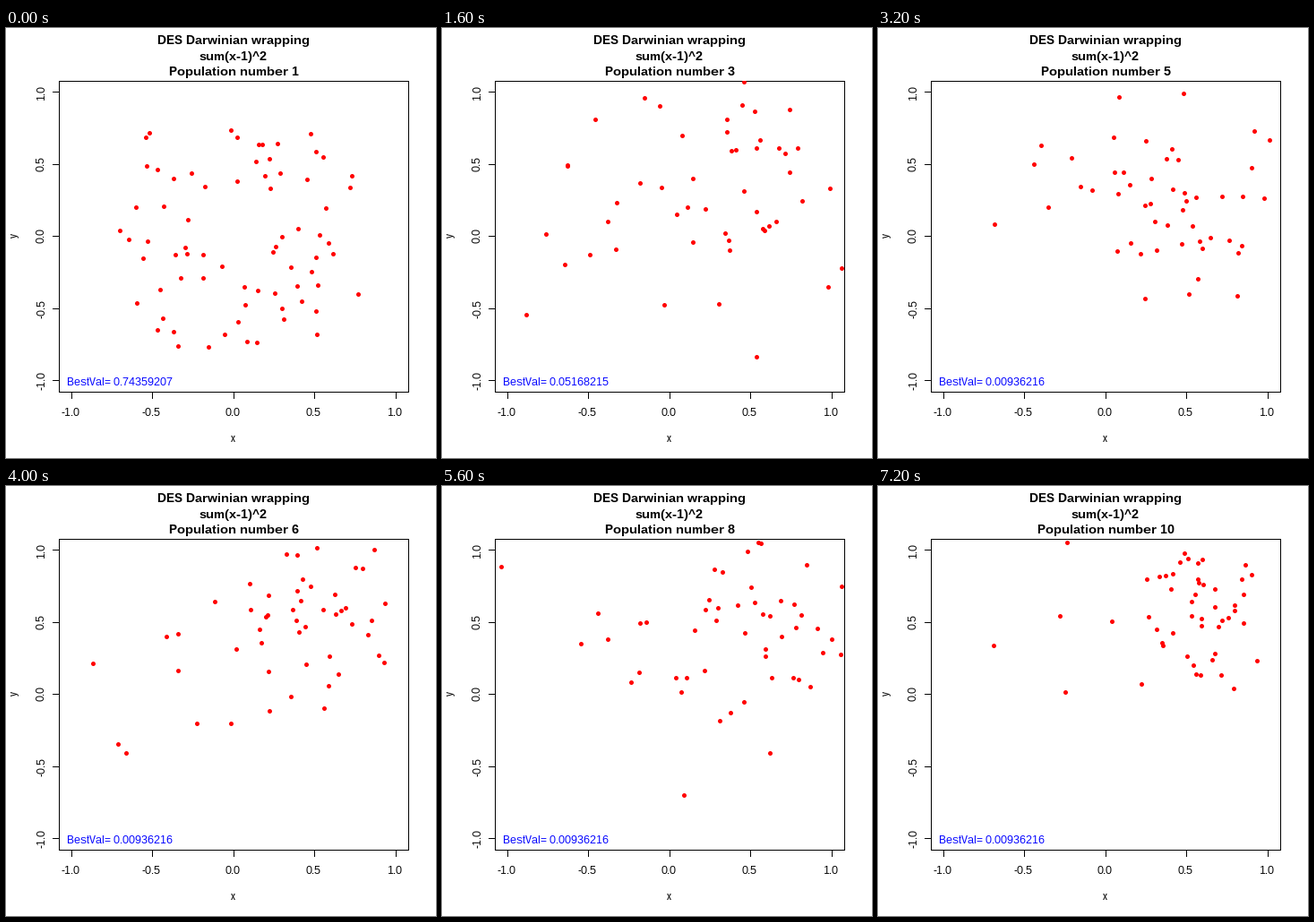
These frames come from a looping animation (480 by 480 pixels, 8000 ms). A matplotlib script:

```python
import matplotlib
import matplotlib.pyplot as plt
import numpy as np
from matplotlib.animation import FuncAnimation
from matplotlib.patches import Rectangle

matplotlib.rcParams.update({
    "font.family": "Liberation Sans",
    "text.hinting": "default",
    "text.hinting_factor": 1,
})

SIZE, DPI = 480, 96
PX = 72 / DPI  # points per pixel
LEFT, TOP, RIGHT, BOTTOM = 59, 59, 449, 406
LIMIT = 1.08  # data range shown on both axes
POPULATIONS, STEP_MS = 10, 800

# Best value found so far, by the population that reached it
BEST = {1: 0.74359207, 2: 0.05168215, 5: 0.00936216}


def to_px(x, y):
    return 254.4 + 180.89 * x, 232.8 - 160.89 * y


def population(n):
    """An even scatter at first, then a cloud that tightens towards (1, 1)."""
    rng = np.random.default_rng(n)
    if n == 1:
        return rng.uniform(-0.77, 0.77, (72, 2))
    t = (n - 2) / (POPULATIONS - 2)
    center = 0.42 + 0.2 * t, 0.3 + 0.36 * t
    spread = 0.4 - 0.12 * t, 0.5 - 0.22 * t
    cloud = rng.normal(center, spread, (200, 2))
    strays = rng.normal((-0.1, 0.1), 0.5, (200, 2))
    points = np.where(rng.random((200, 1)) < 0.16, strays, cloud)
    return points[np.abs(points).max(axis=1) < LIMIT][:50]


fig = plt.figure(figsize=(SIZE / DPI, SIZE / DPI), dpi=DPI, facecolor="white")
ax = fig.add_axes([0, 0, 1, 1])
ax.set_xlim(0, SIZE)
ax.set_ylim(SIZE, 0)
ax.axis("off")


def label(x, y, text, size=12, **style):
    style = {"ha": "center", "va": "baseline",
             "rotation_mode": "anchor", **style}
    return ax.text(x, y, text, fontsize=size * PX, **style)


def line(xs, ys):
    ax.plot(xs, ys, color="black", lw=PX, antialiased=False,
            solid_capstyle="projecting")


line([LEFT, RIGHT, RIGHT, LEFT, LEFT], [TOP, TOP, BOTTOM, BOTTOM, TOP])
for v in np.linspace(-1, 1, 5):
    tx, ty = (int(p) for p in to_px(v, v))
    line([tx, tx], [BOTTOM, BOTTOM + 7])
    line([LEFT - 7, LEFT], [ty, ty])
    label(tx - 1, 433, f"{v:.1f}")
    label(43, ty, f"{v:.1f}", rotation=90)

label(253, 462, "x")
label(13, 232, "y", rotation=90)
label(254, 18, "DES Darwinian wrapping", 14, weight="bold")
label(254, 36, "sum(x-1)^2", 14, weight="bold")
title = label(254, 53, "", 14, weight="bold")
best = label(68, 399, "", ha="left", color="blue")

dots = ax.scatter([], [], s=(5 * PX) ** 2, color="red", linewidths=0,
                  antialiased=False, zorder=3)
dots.set_clip_path(Rectangle((LEFT, TOP), RIGHT - LEFT + 1, BOTTOM - TOP + 1,
                             transform=ax.transData))


def update(frame):
    n = frame + 1
    x, y = to_px(*population(n).T)
    dots.set_offsets(np.floor(np.column_stack([x, y])) + 0.5)
    title.set_text(f"Population number {n}")
    reached = max(k for k in BEST if k <= n)
    best.set_text(f"BestVal= {BEST[reached]:.8f}")
    return dots, title, best


anim = FuncAnimation(fig, update, frames=POPULATIONS, interval=STEP_MS,
                     repeat=True, repeat_delay=0, blit=False)
plt.show()
```
